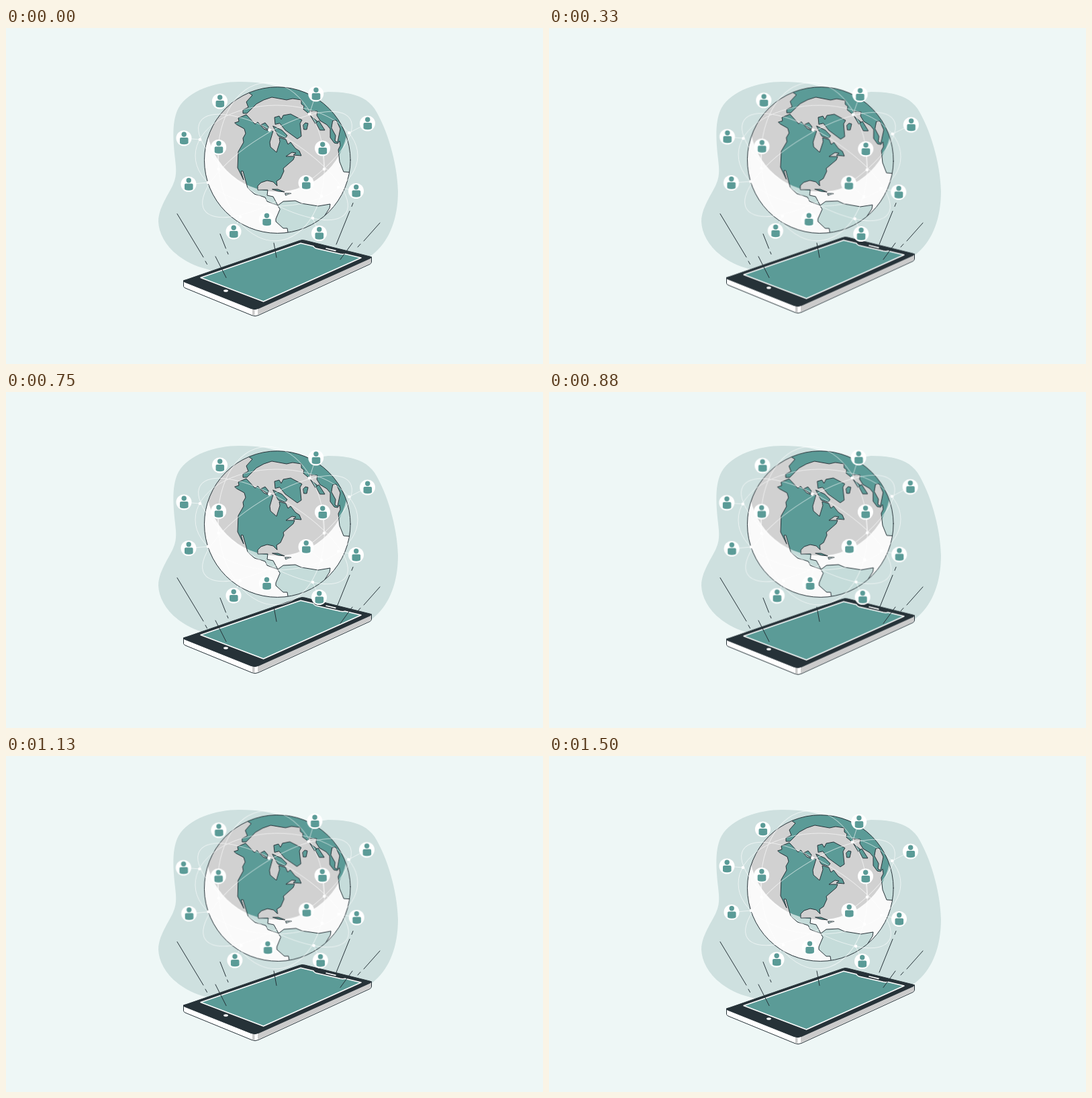
An HTML page for the animation above (1.54 s loop, 800 by 500 pixels).

```html
<!DOCTYPE html>
<html lang="en">
<head>
<meta charset="utf-8">
<title>Connected globe</title>
<style>
  html, body { margin: 0; width: 100%; height: 100%; overflow: hidden; background: #eef7f6; }
  svg { display: block; width: 800px; height: 500px; }
  .line { fill: none; stroke: #263238; stroke-width: 1; stroke-linejoin: round; stroke-linecap: round; }
  .orbit { fill: none; stroke: #fff; stroke-width: 1; opacity: .6; }
  #globe, #phone { animation: 1540ms -5ms infinite; }
  #globe { transform-origin: 403px 198px; animation-name: sway; }
  #phone { animation-name: lift; }
  @keyframes sway {
    0% { transform: rotate(0deg); animation-timing-function: steps(9); }
    24.351% { transform: rotate(1deg); animation-timing-function: steps(18); }
    73.052% { transform: rotate(-1deg); animation-timing-function: steps(9); }
    97.403%, 100% { transform: rotate(0deg); }
  }
  @keyframes lift {
    0% { transform: translateY(0); animation-timing-function: steps(18); }
    48.701% { transform: translateY(-10px); animation-timing-function: steps(18); }
    97.403%, 100% { transform: translateY(0); }
  }
</style>
</head>
<body>
<svg viewBox="0 0 800 500">
  <defs>
    <clipPath id="ball"><circle cx="404.3" cy="196.6" r="108.8"/></clipPath>
    <clipPath id="shade"><circle cx="404" cy="138" r="105.5"/></clipPath>
    <g id="land" fill-rule="evenodd">
      <!-- Arctic, Europe, Africa -->
      <path d="M361 96L367 100 358 110 361 118 353 122 353 127 359 127 373 113 384 107 396 103 418 107 427 105 440 107 440 113 444 116 443 121 453 129 452 123 464 124 463 130 468 138 478 144 483 150 483 163 489 171 494 172 497 168 498 175 495 181 497 199 503 214 530 216V70H350ZM487 138L492 137 498 150 494 170 490 168 491 160 485 149Z"/>
      <!-- North and Central America -->
      <path d="M341 141L347 139 346 134 358 129 371 143 375 140 384 150 391 153 398 153 393 170 394 177 403 185 408 169 407 163 417 166 420 173 424 170 431 179 437 183 440 190 428 189 432 186 426 185 417 191 430 191 428 196 413 209 414 213 409 224 403 228 404 235 398 229 389 227 380 230 375 235 375 241 390 241 389 249 398 251 405 264 389 258 386 252 370 247 360 238 353 213 350 213 354 226 345 208 346 184 354 170 353 164 357 157 355 150 344 144Z"/>
      <!-- South America -->
      <path d="M405 264L413 258 431 257 440 261 465 265 483 262 482 268 473 282 490 310H421L419 298 413 298 402 288 402 284 408 270Z"/>
      <!-- Greenland -->
      <path d="M401 143L400 133 407 131 410 136 413 130 424 128 441 137 438 142 440 161 434 165 416 152 408 142Z"/>
      <!-- Arctic islands -->
      <path d="M380 144L386 141 391 147 390 151ZM398 146L411 152 419 160 416 164 406 161Z"/>
      <!-- Iceland, Scandinavia, Britain -->
      <path d="M443 144L446 141 450 142 448 151 444 151ZM454 131L464 139 461 142ZM462 141L466 138 475 152 468 152Z"/>
      <!-- Caribbean -->
      <path d="M397 240L405 240 415 244 406 243ZM416 246L425 246 417 249Z"/>
    </g>
    <g id="user">
      <circle r="11.5" fill="#fff"/>
      <g fill="#5b9b97">
        <circle cx=".2" cy="-5.8" r="3.7"/>
        <path d="M-4.2-.9H4.8Q6.6-.9 6.6 1V6.5Q6.6 9.2 .3 9.2T-6 6.5V1Q-6-.9-4.2-.9Z"/>
      </g>
    </g>
  </defs>

  <path fill="#cee0df" d="M348 80C312 80 272 93 257 119C247 137 249 166 251 187C253 206 256 218 248 235C240 251 227 269 227 288C228 315 252 347 300 359L380 380 530 346 545 338C573 317 584 280 584 243C583 201 568 150 549 120C535 100 509 95 480 95C457 98 437 101 418 93C397 83 375 80 348 80Z"/>

  <g id="phone">
    <path class="line" style="fill:#fff" d="M264.5 376V384.5Q265 386 267 387L366 427.5Q371 430 376 427.5L542 351.5Q544.5 350 544.5 348V341Z"/>
    <path fill="#cbcbcb" d="M375 417L544 341V348.5L541 351 375 427Z"/>
    <path fill="#cbcbcb" d="M367 418H370.5V428L367 427Z"/>
    <path fill="#263238" stroke="#263238" d="M266 375.5L437 316.5Q441 315 445 316L542 340Q546 341 542 343L377 417Q371 420 365 417.5L266 378Q263 376.5 266 375.5Z"/>
    <path fill="#5b9b97" stroke="#fff" stroke-width="1.5" stroke-linejoin="round" d="M290 371.5L439 320.3 458 324.8Q459 327 462 328L498 336.3Q502 337 505 336.3L529 342 383.5 407Z"/>
    <path stroke="#fff" stroke-width="1.6" stroke-linecap="round" d="M477 328L491 331.4"/>
    <ellipse cx="327.5" cy="391" rx="3.4" ry="1.8" fill="#fff"/>
  </g>

  <g id="globe">
    <g clip-path="url(#ball)">
      <path fill="#fafafa" d="M290 80H520V310H290Z"/>
      <use href="#land" fill="#c5dcda"/>
      <g clip-path="url(#shade)">
        <path fill="#d1d1d1" d="M290 80H520V310H290Z"/>
        <use href="#land" fill="#5b9b97"/>
      </g>
      <use href="#land" class="line"/>
    </g>
    <circle class="line" cx="404.3" cy="196.6" r="108.8"/>
    <g class="orbit">
      <ellipse cx="398" cy="207" rx="128" ry="47" transform="rotate(32 398 207)"/>
      <ellipse cx="404" cy="203" rx="128" ry="47" transform="rotate(-32 404 203)"/>
      <ellipse cx="403" cy="190" rx="121" ry="75"/>
      <ellipse cx="395" cy="199" rx="79" ry="118" transform="rotate(-5 395 199)"/>
    </g>
    <g id="net"></g>
  </g>

  <path class="line" d="M255 276.5L294 341M297 347L299.5 351.5M319 306.5L327.5 328M329.5 333L331 336.5M312 340L328 371.5M399 320L403 341.5M512 272.5L492 322M517 260.5L515 265.5M557 290L533 317M528 321.5L524 326M516 320L498 344.5"/>
</svg>
<script>
  // User position, then the node it hangs on.
  const links = [
    [318.5, 109], [461.7, 98, 452, 128], [538.5, 142, 511, 156],
    [265, 164, 289, 166], [316.7, 177.5, 316.5, 210], [471.5, 179, 474, 210],
    [272, 232.5, 301, 230], [447, 230.5, 470, 250], [521.5, 242.5, 495, 237],
    [388.3, 285, 394, 263], [339, 303, 349, 281], [466.5, 305.5, 457, 283],
    [392.5, 152, 392.5, 152]
  ];
  const nodes = links.filter(l => l.length > 2).map(([x, y, u, v]) =>
    `<path class="orbit" d="M${x} ${y}L${u} ${v}"/><circle cx="${u}" cy="${v}" r="2.3" fill="#fff"/>`);
  const users = links.slice(0, 12).map(([x, y]) => `<use href="#user" x="${x}" y="${y}"/>`);
  document.getElementById('net').innerHTML = nodes.join('') + users.join('');
</script>
</body>
</html>
```
